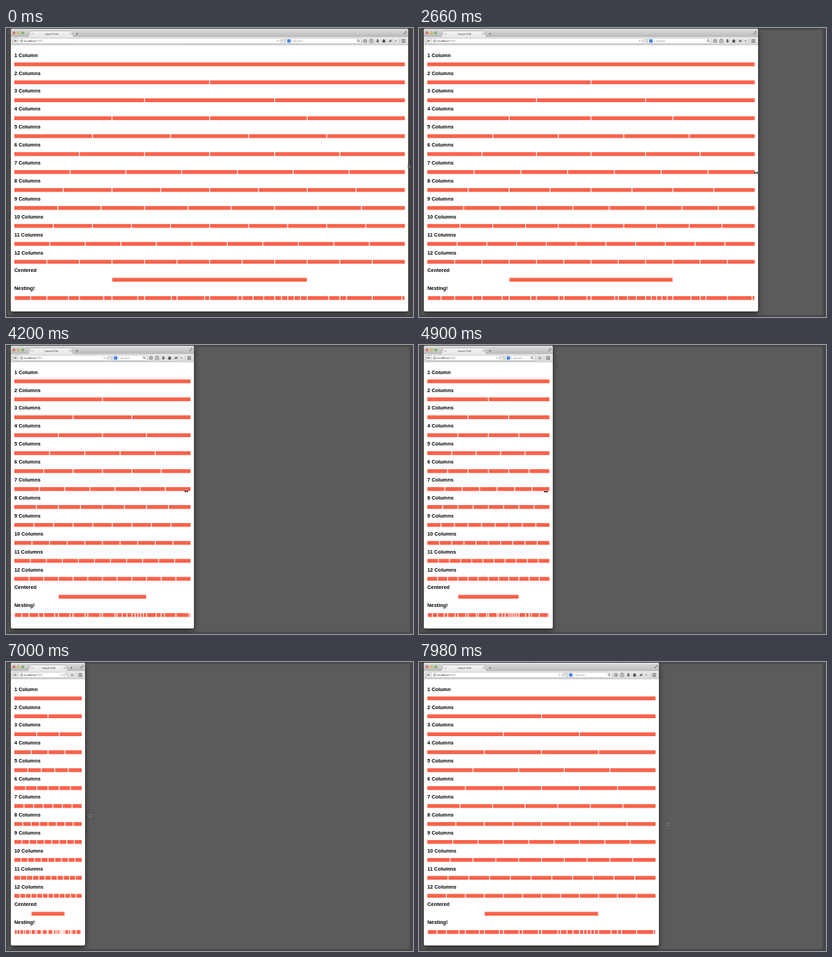
Write an HTML page with a canvas that moves like this. It is 587x417 px and loops after 8 s.

```html
<!DOCTYPE html>
<html lang="en">
<head>
<meta charset="utf-8">
<title>Liquid Grid</title>
<style>
html, body { margin: 0; width: 100%; height: 100%; overflow: hidden; background: #484848; }
canvas { display: block; }
</style>
</head>
<body>
<canvas id="stage" width="587" height="417"></canvas>
<script>
const c = document.getElementById('stage').getContext('2d');
const LOOP = 8000, STEP = 70;
const LEFT = 7, TOP = 1, BOTTOM = 409;
const FONT = '"Liberation Sans", Arial, sans-serif';
const RED = '#fa624a', INK = '#555';

// [time, value] keys
const EDGE = [[0, 580], [1680, 580], [2450, 514], [2660, 489], [3290, 388], [4200, 271],
  [5390, 150], [6000, 118], [6500, 113], [7000, 114], [7490, 205], [7980, 346]];
const LEAD = [[0, 0], [420, 0], [700, -4], [1680, -4], [2660, -3], [4200, -11],
  [5390, -9], [6200, -4], [7000, 7], [7980, 14]];
const CURSOR_Y = [[0, 199], [1680, 199], [2660, 209], [4200, 211], [5390, 212], [7000, 222], [7980, 234]];

// Column splits inside each cell of the nested row
const parts = n => Array.from({ length: n - 1 }, (_, i) => (i + 1) / n);
const NESTED = [1, 2, 3, 4, 5, 6, 7].map(n => [n / (n + 1)])
  .concat([parts(3), parts(5), [2 / 3], [1 / 5], [11 / 12]]);

function segment(keys, t) {
  let i = 0;
  while (i < keys.length - 2 && t >= keys[i + 1][0]) i++;
  const [t0, a] = keys[i], [t1, b] = keys[i + 1];
  return { i, a, b, span: t1 - t0, u: Math.min(1, Math.max(0, (t - t0) / (t1 - t0))) };
}

function linear(keys, t) {
  const { a, b, u } = segment(keys, t);
  return a + (b - a) * u;
}

// Monotone cubic interpolation
function smooth(keys, t) {
  const { i, a, b, span, u } = segment(keys, t);
  const rate = k => k < 0 || k > keys.length - 2 ? null :
    (keys[k + 1][1] - keys[k][1]) / (keys[k + 1][0] - keys[k][0]);
  const slope = k => {
    const p = rate(k - 1), q = rate(k);
    if (p === null) return q;
    if (q === null) return p;
    return p * q <= 0 ? 0 : 2 * p * q / (p + q);
  };
  const v = 1 - u;
  return a * v * v * (1 + 2 * u) + b * u * u * (3 - 2 * u) +
    span * u * v * (slope(i) * v - slope(i + 1) * u);
}

function box(x, y, w, h, r, fill, stroke) {
  c.beginPath();
  c.roundRect(x, y, w, h, r);
  if (fill) { c.fillStyle = fill; c.fill(); }
  if (stroke) { c.strokeStyle = stroke; c.lineWidth = 0.6; c.stroke(); }
}

function dot(x, y, r, fill, stroke) {
  box(x - r, y - r, 2 * r, 2 * r, r, fill, stroke);
}

function line(points, color = INK, width = 0.7) {
  c.beginPath();
  for (let i = 0; i < points.length; i += 2) c.lineTo(points[i], points[i + 1]);
  c.strokeStyle = color;
  c.lineWidth = width;
  c.stroke();
}

function shape(points, fill) {
  c.beginPath();
  for (let i = 0; i < points.length; i += 2) c.lineTo(points[i], points[i + 1]);
  c.fillStyle = fill;
  c.fill();
}

function text(str, x, y, size, color, align = 'left', weight = '') {
  c.font = `${weight} ${size}px ${FONT}`;
  c.textAlign = align;
  c.fillStyle = color;
  c.fillText(str, x, y);
}

function shade(y0, y1, from, to) {
  const g = c.createLinearGradient(0, y0, 0, y1);
  g.addColorStop(0, from);
  g.addColorStop(1, to);
  return g;
}

function desktop() {
  c.fillStyle = '#464646';
  c.fillRect(0, 0, 587, 417);
  box(2, 2, 581, 413, 3, '#535353');
  box(3.5, 3.5, 578, 410, 3, '#5b5b5b');
}

function titleBar(r) {
  c.fillStyle = shade(TOP, 13, '#dedede', '#b9b9b9');
  c.fillRect(LEFT, TOP, r - LEFT, 12);
  ['#ee6a5f', '#f0bd50', '#6cbf55'].forEach((color, i) => dot(11.5 + i * 6.3, 7, 1.9, color, '#8888'));

  const end = Math.min(97, r - 25);
  c.beginPath();
  c.moveTo(30, 13.2);
  c.bezierCurveTo(35, 13, 32, 4.2, 37, 4.2);
  c.lineTo(end - 5, 4.2);
  c.bezierCurveTo(end, 4.2, end - 3, 13, end + 2, 13.2);
  c.fillStyle = shade(4, 13, '#f4f4f4', '#e7e7e7');
  c.fill();
  c.strokeStyle = '#999';
  c.lineWidth = 0.5;
  c.stroke();

  line([36, 8.5, 40, 8.5], '#8db5da', 0.9);
  text('Liquid Grid', (end + 34) / 2, 10, 4, '#444', 'center');
  const x = end - 4.5;
  line([x - 1.2, 7.3, x + 1.2, 9.7], '#777', 0.6);
  line([x + 1.2, 7.3, x - 1.2, 9.7], '#777', 0.6);
  line([end + 3.5, 8.5, end + 7, 8.5], '#666');
  line([end + 5.2, 6.8, end + 5.2, 10.2], '#666');

  line([r - 6, 8.5, r - 2.5, 5], '#666');
  line([r - 4.2, 5, r - 2.5, 5, r - 2.5, 6.7], '#666');
  line([r - 6, 6.8, r - 6, 8.5, r - 4.3, 8.5], '#666');
}

function icons(r) {
  const y = 18.6;
  let x = r - 62;
  const star = [];
  for (let i = 0; i < 11; i++) {
    const a = -Math.PI / 2 + i * Math.PI / 5, d = i % 2 ? 1.2 : 2.7;
    star.push(x + d * Math.cos(a), y + d * Math.sin(a));
  }
  line(star);
  x += 9;
  box(x - 2.2, y - 1.8, 4.4, 4.2, 0.5, null, INK);
  line([x - 1, y - 2.5, x + 1, y - 2.5]);
  line([x - 1, y + 0.3, x + 1, y + 0.3]);
  x += 9;
  shape([x - 0.8, y - 2.6, x + 0.8, y - 2.6, x + 0.8, y, x + 2.4, y, x, y + 2.6, x - 2.4, y, x - 0.8, y], INK);
  x += 9;
  shape([x - 2.8, y, x, y - 2.7, x + 2.8, y, x + 1.9, y, x + 1.9, y + 2.5, x - 1.9, y + 2.5, x - 1.9, y], INK);
  x += 9;
  shape([x - 2.4, y + 0.6, x + 1, y - 1.8, x + 1, y + 1.6], INK);
  line([x + 2, y - 1.7, x + 2, y + 1.4]);
  x += 8;
  shape([x - 1.2, y - 0.6, x + 1.2, y - 0.6, x, y + 1], INK);
}

function toolBar(r) {
  c.fillStyle = shade(13, 24, '#e9e9e9', '#d9d9d9');
  c.fillRect(LEFT, 13, r - LEFT, 11.3);
  line([LEFT, 24.3, r, 24.3], '#a8a8a8', 0.6);

  const compact = r < 215, hasSearch = r > 130;
  const limit = r - (compact ? 25.5 : 67.5);
  const width = hasSearch ? 50 + 0.191 * (limit - 204) : 0;
  const urlEnd = hasSearch ? limit - width - 2.8 : limit;

  box(16, 14.8, urlEnd - 16, 7.8, 1, '#fff', '#aaa');
  dot(14, 18.7, 4.1, '#f3f3f3', '#999');
  line([16, 18.7, 12.2, 18.7], INK, 0.9);
  line([13.8, 17, 12.1, 18.7, 13.8, 20.4], INK, 0.9);
  dot(22.5, 18.7, 1.9, null, '#777');
  line([20.6, 18.7, 24.4, 18.7], '#777', 0.4);
  line([22.5, 16.8, 22.5, 20.6], '#777', 0.4);
  text('localhost', 26.3, 20.2, 4.2, '#222');
  text(':8080', 42.3, 20.2, 4.2, '#999');

  const d = urlEnd - 9;
  shape([d - 1.3, 18, d + 1.3, 18, d, 19.6], '#888');
  c.beginPath();
  c.arc(urlEnd - 4, 18.7, 1.7, -0.4, 5);
  c.strokeStyle = '#777';
  c.lineWidth = 0.6;
  c.stroke();
  shape([urlEnd - 3.2, 17.8, urlEnd - 1.6, 17.8, urlEnd - 1.7, 16.1], '#777');

  if (hasSearch) {
    const s = limit - width;
    box(s, 14.8, width, 7.8, 1, '#fff', '#aaa');
    box(s + 2, 16.2, 5, 5, 0, '#4a86e0');
    shape([s + 8, 18.2, s + 10, 18.2, s + 9, 19.5], '#888');
    text('Quenzi', s + 11.5, 20.2, 4.2, '#888');
    dot(limit - 4.5, 18.1, 1.4, null, '#444');
    line([limit - 3.5, 19.1, limit - 2.1, 20.5], '#444', 0.8);
  }

  if (compact) {
    for (const x of [r - 20.3, r - 18.2]) line([x, 17.1, x + 1.6, 18.7, x, 20.3], INK, 0.8);
  } else {
    icons(r);
  }
  line([r - 12.5, 15.5, r - 12.5, 22], '#bbb', 0.5);
  for (let i = 0; i < 3; i++) line([r - 9.5, 16.7 + i * 2, r - 4, 16.7 + i * 2], INK, 0.9);
}

function bar(x0, x1, y) {
  c.fillStyle = RED;
  c.fillRect(x0, y, x1 - x0, 5.5);
}

function cells(x0, x1, y, cuts) {
  const gap = 0.6, edges = [0, ...cuts, 1];
  for (let i = 1; i < edges.length; i++) {
    bar(x0 + (x1 - x0) * edges[i - 1] + (i > 1 ? gap : 0),
      x0 + (x1 - x0) * edges[i] - (i < edges.length - 1 ? gap : 0), y);
  }
}

function page(r) {
  const x0 = 12, x1 = r - 4.8, w = x1 - x0;
  for (let row = 0; row < 14; row++) {
    const n = row + 1, y = 49.7 + row * 25.9;
    const title = row === 12 ? 'Centered' : row === 13 ? 'Nesting!' : `${n} Column${n > 1 ? 's' : ''}`;
    text(title, x0, y - 8.1, 7.4, '#000', 'left', 'bold');
    if (row < 12) {
      cells(x0, x1, y, parts(n));
    } else if (row === 12) {
      bar(x0 + w / 4 + 0.5, x1 - w / 4 - 0.5, y);
    } else {
      NESTED.forEach((cuts, i) =>
        cells(x0 + w * i / 12 + 0.7, x0 + w * (i + 1) / 12 - 0.6, y + 0.5, cuts));
    }
  }
}

function browser(r) {
  c.save();
  c.shadowColor = 'rgba(0,0,0,.6)';
  c.shadowBlur = 9;
  c.shadowOffsetY = 3;
  box(LEFT, TOP, r - LEFT, BOTTOM - TOP, 2, '#fff');
  c.restore();
  c.save();
  c.beginPath();
  c.roundRect(LEFT, TOP, r - LEFT, BOTTOM - TOP, 2);
  c.clip();
  titleBar(r);
  toolBar(r);
  page(r);
  c.restore();
}

function cursor(x, y, arrow) {
  if (arrow) {
    const p = [x - 0.5, y - 2.5, x - 0.5, y + 3, x + 0.8, y + 1.8, x + 2.8, y + 1.6, x - 0.5, y - 2.5];
    shape(p, '#111');
    line(p, '#ddd', 0.6);
    return;
  }
  const heads = [x - 3, y, x - 1, y - 1.7, x - 1, y - 0.5, x + 1, y - 0.5, x + 1, y - 1.7,
    x + 3, y, x + 1, y + 1.7, x + 1, y + 0.5, x - 1, y + 0.5, x - 1, y + 1.7, x - 3, y];
  line(heads, '#e8e8e8', 0.9);
  shape(heads, '#111');
}

function draw(now) {
  const t = Math.floor(now % LOOP / STEP) * STEP;
  const r = smooth(EDGE, t);
  desktop();
  browser(r);
  cursor(r + linear(LEAD, t), linear(CURSOR_Y, t), t < 560);
}

const start = performance.now();
function tick() {
  draw(performance.now() - start);
  requestAnimationFrame(tick);
}
tick();
</script>
</body>
</html>
```
